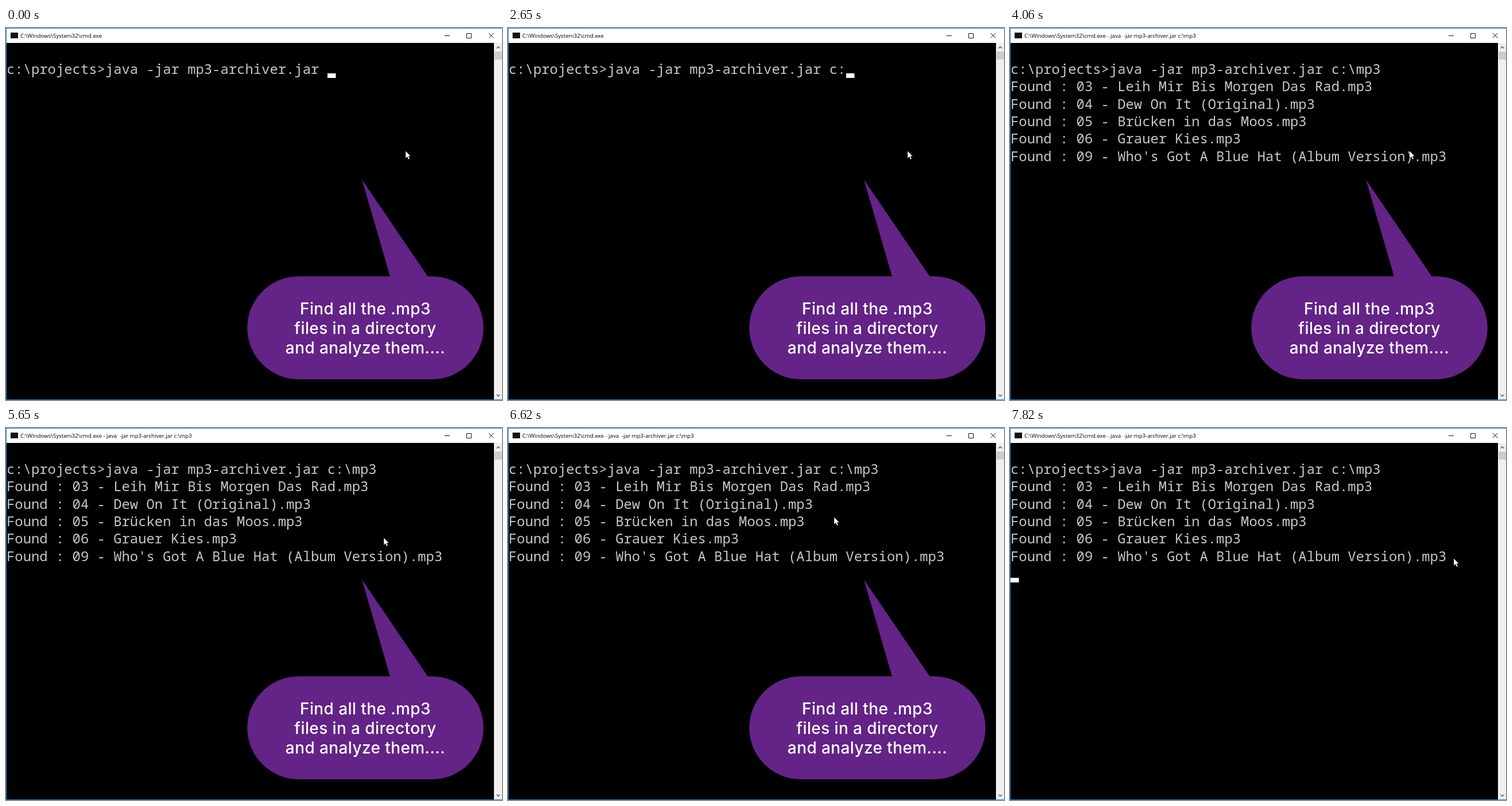
Write an HTML page that moves like this. It is 864 px wide and 648 px high and loops after 8000 ms.

```html
<!DOCTYPE html>
<html lang="en">
<head>
<meta charset="utf-8">
<title>Console</title>
<style>
  html, body { margin: 0; width: 100%; height: 100%; overflow: hidden; background: #000; }
  svg { display: block; width: 864px; height: 648px; }
  text { white-space: pre; }
  .term { font: 23.89px "Noto Sans Mono", "DejaVu Sans Mono", monospace; fill: #c6c6c6; font-variant-ligatures: none; }
  .title { font: 9.7px "Open Sans", "Noto Sans", sans-serif; fill: #000; }
  .say { font: 500 28px Inter, "Open Sans", sans-serif; letter-spacing: .4px; fill: #fff; text-anchor: middle; }
  #bubble { filter: drop-shadow(6px 6px 4px rgba(0, 0, 0, .5)); }
</style>
</head>
<body>
<svg viewBox="0 0 864 648">
  <rect width="864" height="648" fill="#1a82d2"/>
  <rect x="1" y="1" width="863" height="25" fill="#fff"/>
  <rect x="1" y="26" width="849" height="621" fill="#000"/>
  <rect x="850" y="26" width="14" height="621" fill="#f0f0f0"/>
  <rect x="851" y="41" width="13" height="14" fill="#cdcdcd"/>
  <rect x="8" y="8" width="13" height="10" fill="#111"/>
  <text class="title" id="title" x="25" y="17"></text>
  <g fill="none" stroke="#111">
    <path d="M764 13.5H773M802.5 9.5H810.5V17.5H802.5ZM841 9L849.5 17.5M849.5 9L841 17.5"/>
    <path d="M854.5 35.5L857.5 32.5L860.5 35.5M854.5 638.5L857.5 641.5L860.5 638.5" stroke="#555" stroke-width="1.4"/>
  </g>
  <g id="rows"></g>
  <rect id="caret" width="14.5" height="8" fill="#fff"/>
  <g id="bubble">
    <path d="M620 264L734.5 432.5H742A89.7 89.7 0 0 1 742 612H510A89.7 89.7 0 0 1 510 432.5H669Z" fill="#642386"/>
    <text class="say" x="626" y="499">Find all the .mp3</text>
    <text class="say" x="626" y="533">files in a directory</text>
    <text class="say" x="626" y="567">and analyze them....</text>
  </g>
  <path id="mouse" d="M0 0V13L3 10.3L5 15L7.2 14L5.2 9.5H9Z" fill="#fff" stroke="#000" stroke-width=".5"/>
</svg>
<script>
const LOOP = 8000, CELL = 14.33, ROW = 30.33;
const $ = id => document.getElementById(id);

const prompt = "c:\\projects>java -jar mp3-archiver.jar ";
const typed = "c:\\mp3";
const found = [
  "03 - Leih Mir Bis Morgen Das Rad.mp3",
  "04 - Dew On It (Original).mp3",
  "05 - Brücken in das Moos.mp3",
  "06 - Grauer Kies.mp3",
  "09 - Who's Got A Blue Hat (Album Version).mp3"
];
const shell = "C:\\Windows\\System32\\cmd.exe";

const keyTimes = [2340, 2650, 2890, 3240, 3320, 3410];
const runTime = 3890, bubbleEnd = 6650;
const foundTimes = [3990, 3990, 4030, 4030, 4060];

// moments when the caret turns [on, off]
const caretOn = [
  [0, 370], [930, 1440], [2000, 2510], [2650, 3000], [3240, 3580],
  [4650, 5130], [5680, 6210], [6740, 7270], [7820, LOOP]
];

// pointer path: time, x, y
const path = [
  [5450, 696, 214], [5650, 658, 191], [5850, 613, 135], [6050, 586, 104],
  [6270, 574, 121], [6450, 570, 137], [6620, 568, 155], [6650, 567, 159],
  [6850, 620, 192], [7100, 754, 219], [7270, 773, 227]
];

const rows = [prompt, ...found].map((_, i) => {
  const t = document.createElementNS("http://www.w3.org/2000/svg", "text");
  t.setAttribute("class", "term");
  t.setAttribute("x", 1);
  t.setAttribute("y", 80 + i * ROW);
  return $("rows").appendChild(t);
});

const setText = (el, s) => { if (el.textContent !== s) el.textContent = s; };
const show = (el, on) => el.setAttribute("visibility", on ? "visible" : "hidden");
const passed = (times, t) => times.filter(k => t >= k).length;

function pointer(t) {
  const i = path.findIndex(p => p[0] > t);
  if (i === 0) return path[0].slice(1);
  if (i < 0) return path[path.length - 1].slice(1);
  const a = path[i - 1], b = path[i], u = (t - a[0]) / (b[0] - a[0]);
  return [1, 2].map(k => Math.round(a[k] + (b[k] - a[k]) * u));
}

function draw(t) {
  const keys = passed(keyTimes, t), lines = passed(foundTimes, t);
  const running = t >= runTime;
  setText($("title"), running ? shell + " - java  -jar mp3-archiver.jar c:\\mp3" : shell);
  setText(rows[0], prompt + typed.slice(0, keys));
  found.forEach((s, i) => setText(rows[i + 1], i < lines ? "Found : " + s : ""));

  const col = running ? 0 : prompt.length + keys;
  $("caret").setAttribute("x", Math.round(1 + col * CELL));
  $("caret").setAttribute("y", running ? 261 : 79);
  show($("caret"), caretOn.some(([a, b]) => t >= a && t < b));

  show($("bubble"), t < bubbleEnd);
  $("mouse").setAttribute("transform", `translate(${pointer(t)})`);
}

const start = performance.now();
function tick() {
  draw((performance.now() - start) % LOOP);
  requestAnimationFrame(tick);
}
tick();
</script>
</body>
</html>
```
